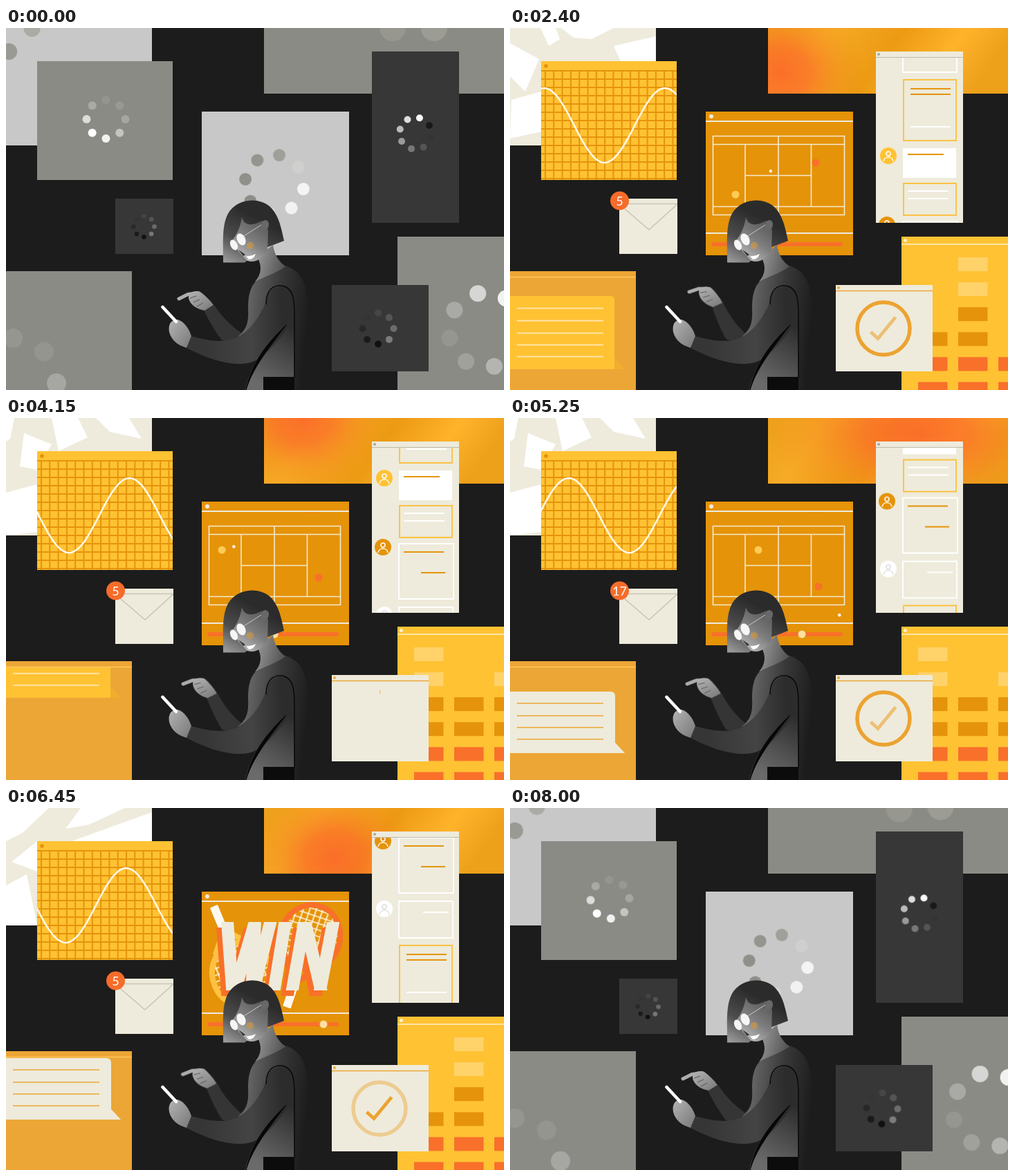
An HTML page that plays this animation: 720x524 px, repeating every 8.05 s.

```html
<!DOCTYPE html>
<html lang="en">
<head>
<meta charset="utf-8">
<title>Loading windows</title>
<style>
html, body { margin: 0; width: 100%; height: 100%; overflow: hidden; background: #1c1c1c; }
#stage { display: block; width: 720px; height: 524px; }
#stage * { animation-duration: 8.05s; animation-iteration-count: infinite; animation-timing-function: linear; }

#stage .page { animation-name: loaded; animation-timing-function: step-end; animation-delay: calc(var(--at) - 8.05s); }
@keyframes loaded { 0% { opacity: 1 } 75.776%, 100% { opacity: 0 } }

.dots { --turn: 226deg; animation-name: spin; }
.dots.back { --turn: -115deg; }
@keyframes spin {
  0%, 100% { transform: rotate(0deg) }
  50% { transform: rotate(var(--turn)) }
  50.01% { transform: rotate(calc(-1 * var(--turn))) }
}

#map { animation-name: map; }
@keyframes map {
  0%, 17.4% { d: path("M42 0L140 0L80 48L0 56Z M22 74L45 48L45 140L30 112Z M20 132L45 120L45 170L14 170Z M192 0L211 0L211 48L196 48Z M0 60L14 62L10 84L0 92Z") }
  29.8% { d: path("M0 22L42 45L22 92L0 70Z M74 0L150 0L118 16L92 14Z M2 104L45 92L45 150L0 160Z M44 0L66 0L72 16L56 26Z M150 26L211 12L211 48L160 48Z") }
  51.5%, 65.3% { d: path("M26 22L66 38L45 75L20 70Z M66 0L104 0L118 28L76 48Z M0 108L45 96L45 165L0 170Z M130 0L178 0L196 30L150 20Z M0 0L12 0L6 30L0 34Z") }
  80%, 100% { d: path("M0 0L62 0L24 36L0 48Z M108 0L172 0L120 24L86 30Z M0 112L30 96L45 170L0 170Z M95 48L211 6L211 48L130 48Z M8 78L45 48L45 92L24 84Z") }
}

#wave { animation-name: wave; }
@keyframes wave { to { transform: translateX(595.7px) } }

#glow { animation-name: glow; }
@keyframes glow {
  0%, 17.4% { transform: translate(440px, 118px) scale(1.2, .9) }
  29.8% { transform: translate(390px, 64px) }
  51.5% { transform: translate(428px, 0px) }
  65.2% { transform: translate(590px, 22px) scale(1.8, 1.1) }
  80.1% { transform: translate(475px, 72px) }
  100% { transform: translate(430px, 100px) }
}

#feed { animation-name: feed; }
@keyframes feed {
  0%, 17.4% { transform: translateY(0); animation-timing-function: cubic-bezier(.33, 0, .67, .33) }
  29.81% { transform: translateY(-27px) }
  51.55% { transform: translateY(-125px) }
  80.12% { transform: translateY(-264px) }
  100% { transform: translateY(-361px) }
}

#knob { animation-name: knob; }
@keyframes knob { 0%, 12.8% { transform: translateX(292px) } 88.6%, 100% { transform: translateX(480px) } }
#stage #play, #stage #court { animation-timing-function: step-end; }
#play { animation-name: play; }
@keyframes play { 0% { opacity: 1 } 50%, 100% { opacity: 0 } }
#court { animation-name: court; }
@keyframes court { 0% { opacity: 0 } 23.6% { opacity: 1 } 72.67%, 100% { opacity: 0 } }
#near { animation-name: near; }
@keyframes near {
  0%, 23% { transform: translate(318px, 222px) }
  29.81% { transform: translate(326px, 241px) }
  34.2% { transform: translate(320px, 232px) }
  51.55% { transform: translate(312px, 191px) }
  62%, 100% { transform: translate(359px, 191px) }
}
#far { animation-name: far; }
@keyframes far {
  0%, 23% { transform: translate(442px, 188px) }
  29.81% { transform: translate(442px, 195px) }
  42.2% { transform: translate(455px, 216px) }
  51.55% { transform: translate(452px, 231px) }
  65.22%, 100% { transform: translate(446px, 244px) }
}
#ball { animation-name: ball; }
@keyframes ball {
  0%, 24% { transform: translate(438px, 190px) }
  29.81% { transform: translate(377px, 207px) }
  34.2% { transform: translate(326px, 228px) }
  42.2% { transform: translate(450px, 215px) }
  50.3% { transform: translate(317px, 188px) }
  51.55% { transform: translate(329px, 186px) }
  57.1% { transform: translate(447px, 236px) }
  61.5% { transform: translate(362px, 194px) }
  65.22% { transform: translate(476px, 285px) }
  66.5%, 100% { transform: translate(515px, 315px) }
}
#win { transform-origin: 395px 215px; animation-name: win; }
@keyframes win {
  0%, 75.1% { opacity: 0; transform: scale(.6) }
  75.2% { opacity: 1; transform: scale(.6) }
  77%, 100% { opacity: 1; transform: none }
}

#note1 { animation-name: note1; }
@keyframes note1 {
  0%, 18% { transform: translateY(150px); animation-timing-function: ease-out }
  27% { transform: translateY(2px) }
  44% { transform: translateY(-30px) }
  51.55% { transform: translateY(-92px) }
  56%, 100% { transform: translateY(-150px) }
}
#note2 { animation-name: note2; }
@keyframes note2 {
  0%, 51.8% { transform: translateY(130px); animation-timing-function: ease-out }
  62% { transform: translateY(7px) }
  65.22% { transform: none }
  80.12% { transform: translateY(-34px) }
  100% { transform: translateY(-79px) }
}

#stage .tick { animation-duration: 2.68333s; animation-delay: -1.2667s; }
#ring { stroke-dasharray: 100; animation-name: ring; }
@keyframes ring {
  0%, 1.8% { stroke-dashoffset: 99.8; opacity: .5 }
  5% { opacity: 1 }
  25% { stroke-dashoffset: 0 }
  78% { stroke-dashoffset: 0; opacity: 1 }
  87.5% { opacity: .45 }
  95%, 100% { stroke-dashoffset: 0; opacity: 0 }
}
#mark { animation-name: mark; }
@keyframes mark { 0%, 28% { opacity: 0 } 36%, 44% { opacity: .6 } 55%, 90% { opacity: 1 } 97%, 100% { opacity: 0 } }

#stage .bars { animation-timing-function: step-end; }
#barsA { animation-name: barsA; }
#barsB { animation-name: barsB; }
@keyframes barsA { 0% { opacity: 1 } 40% { opacity: 0 } 72%, 100% { opacity: 1 } }
@keyframes barsB { 0% { opacity: 0 } 40% { opacity: 1 } 72%, 100% { opacity: 0 } }

#arm { transform-origin: 326px 452px; animation-name: arm; }
@keyframes arm {
  0%, 2% { transform: rotate(0deg); animation-timing-function: ease-in-out }
  13%, 17.4% { transform: rotate(9deg) }
  29.8% { transform: rotate(8deg) }
  51.5%, 65.2% { transform: rotate(5.5deg) }
  80.1%, 84% { transform: rotate(5deg); animation-timing-function: ease-in-out }
  96%, 100% { transform: rotate(0deg) }
}
#count { font: 18px Lato, "Open Sans", sans-serif; }
</style>
</head>
<body>
<svg id="stage" viewBox="0 0 720 524" width="720" height="524" fill="none">
<defs>
  <pattern id="grid" x="50" y="61" width="12.3" height="12" patternUnits="userSpaceOnUse"><path d="M0 1H12.3M1 0V12" stroke="#e5930a" stroke-width="2"/></pattern>
  <pattern id="strings" width="9" height="9" patternUnits="userSpaceOnUse"><path d="M0 4.5H9M4.5 0V9" stroke="#fff8e6" stroke-width="1.7"/></pattern>
  <radialGradient id="hot"><stop stop-color="#fb6a2b" stop-opacity=".92"/><stop offset=".35" stop-color="#fb6f29" stop-opacity=".75"/><stop offset=".7" stop-color="#f88224" stop-opacity=".3"/><stop offset="1" stop-color="#f88c1c" stop-opacity="0"/></radialGradient>
  <linearGradient id="amber" x2="1" y2=".2"><stop stop-color="#eda01a"/><stop offset=".25" stop-color="#f6ab26"/><stop offset=".55" stop-color="#ec9a14"/><stop offset=".8" stop-color="#ffb32b"/><stop offset="1" stop-color="#eda01a"/></linearGradient>
  <linearGradient id="hair" x1=".1" y1="1" x2=".5" y2=".25"><stop stop-color="#989898"/><stop offset=".45" stop-color="#4c4c4c"/><stop offset="1" stop-color="#2b2b2b"/></linearGradient>
  <linearGradient id="skin" x1=".2" y1="1" x2=".8" y2="0"><stop stop-color="#c2c2c2"/><stop offset=".5" stop-color="#7d7d7d"/><stop offset="1" stop-color="#555"/></linearGradient>
  <linearGradient id="neck" x2="1" y2=".3"><stop stop-color="#a0a0a0"/><stop offset="1" stop-color="#565656"/></linearGradient>
  <linearGradient id="body" gradientUnits="userSpaceOnUse" x1="348" y1="410" x2="437" y2="420"><stop stop-color="#656565"/><stop offset=".5" stop-color="#383838"/><stop offset="1" stop-color="#1c1c1c"/></linearGradient>
  <linearGradient id="side" gradientUnits="userSpaceOnUse" x1="362" y1="512" x2="412" y2="430"><stop stop-color="#6a6a6a"/><stop offset="1" stop-color="#2c2c2c"/></linearGradient>
  <linearGradient id="sleeve" gradientUnits="userSpaceOnUse" x1="285" y1="430" x2="400" y2="425"><stop stop-color="#363636"/><stop offset=".6" stop-color="#444"/><stop offset="1" stop-color="#2c2c2c"/></linearGradient>
  <linearGradient id="hand" x2="1" y2="1"><stop stop-color="#b4b4b4"/><stop offset="1" stop-color="#777"/></linearGradient>
  <clipPath id="cap"><rect x="295" y="165" width="200" height="99"/></clipPath>
  <g id="racket">
    <ellipse rx="41" ry="45" fill="url(#strings)"/>
    <ellipse rx="43" ry="47" stroke="currentColor" stroke-width="8"/>
    <path d="M-25 41L-3 66V76M25 41L3 66V76" stroke="currentColor" stroke-width="8"/>
    <rect x="-6" y="73" width="12" height="34" rx="1" fill="#fffaf0"/>
  </g>
  <g id="person" stroke="#fff" stroke-width="1.5"><circle cy="-3" r="3"/><path d="M-7 8C-6 0 6 0 7 8"/></g>
  <path id="letters" d="M319 150L328 274L360 165L355 274L386 150M386 274L406 150M412 274L434 150M431 160L457 270M452 274L476 150" stroke-width="18"/>
</defs>

<svg width="211" height="170" viewBox="0 0 211 170">
  <rect width="211" height="170" fill="#c8c8c8"/>
  <g class="dots" data-ring="-19 -23 61.5 12 22.8" data-tones="ababa5 9a9a94 95958f a0a09a"/>
  <g class="page" style="--at:1.2s"><rect width="211" height="170" fill="#eeebdc"/><path id="map" d="M0 0" fill="#fff"/></g>
</svg>

<svg x="45" y="48" width="196" height="172" viewBox="45 48 196 172">
  <rect x="45" y="48" width="196" height="172" fill="#8a8b85"/>
  <g class="dots" data-ring="144.5 132 28 6 -90" data-tones="94958f 989993 a5a6a0 c4c5c0 f2f2f1 fff dcdcda a9aaa4"/>
  <g class="page" style="--at:1.6s">
    <rect x="45" y="48" width="196" height="172" fill="#ffc233"/>
    <rect x="45" y="61" width="196" height="159" fill="url(#grid)"/>
    <circle cx="52" cy="55" r="2.8" fill="#e5930a"/>
    <path id="wave" stroke="#fffdf4" stroke-width="2.4"/>
  </g>
</svg>

<svg x="373" width="347" height="95" viewBox="373 0 347 95">
  <rect x="373" width="347" height="95" fill="#8a8b85"/>
  <g class="dots" data-ring="589 -72 78 19 67.4" data-tones="9c9c95 979790"/>
  <g class="page" style="--at:1.1s"><rect x="373" width="347" height="95" fill="url(#amber)"/><ellipse id="glow" rx="120" ry="105" fill="url(#hot)"/></g>
</svg>

<svg x="529" y="34" width="126" height="248" viewBox="529 34 126 248">
  <rect x="529" y="34" width="126" height="248" fill="#373737"/>
  <g class="dots back" data-ring="592 152.5 23 5 -75" data-tones="fafafa 191919 343434 555 777 999 bbb ddd"/>
  <g class="page" style="--at:1.3s">
    <rect x="529" y="34" width="126" height="248" fill="#eeebdc"/>
    <g id="feed" stroke-width="1.8">
      <g id="thread">
        <circle cx="547" cy="49" r="12" fill="#fff"/><use href="#person" x="547" y="49" style="filter:brightness(.87)"/>
        <path d="M568 38H646V91H568ZM603 54H640M579 170H637M575 263H634M575 274H634M568 307H647V387H568Z" stroke="#fff"/>
        <path d="M569 102H645V190H569ZM569 252H645V298H569Z" stroke="#fbc040"/>
        <path d="M579 115H637M579 123H637M575 319H633M600 349H635" stroke="#e5930a"/>
        <rect x="568" y="201" width="77" height="43" fill="#fff"/><path d="M575 210H627" stroke="#e5930a"/>
        <circle cx="547" cy="212" r="12" fill="#ffc233"/><use href="#person" x="547" y="212"/>
        <circle cx="545" cy="312" r="12" fill="#e5930a"/><use href="#person" x="545" y="312"/>
      </g>
      <use href="#thread" y="361"/>
    </g>
    <rect x="529" y="34" width="126" height="8" fill="#eeebdc"/>
    <path d="M529 42.5H655" stroke="#bdb9aa"/><circle cx="533" cy="38" r="2" fill="#aaa79a"/>
  </g>
</svg>

<svg x="283" y="121" width="213" height="208" viewBox="283 121 213 208">
  <rect x="283" y="121" width="213" height="208" fill="#c8c8c8"/>
  <g class="dots" data-ring="388 226 42.5 9 -80.5" data-tones="a0a09a cfd0ce f4f4f4 f2f2f2 d4d4d3 8d8d89 90908b 95958f"/>
  <g class="page" style="--at:.95s">
    <rect x="283" y="121" width="213" height="208" fill="#e59309"/>
    <use href="#racket" color="#ffc143" transform="translate(341.5 241) rotate(157.4)"/>
    <use href="#racket" color="#f8702a" transform="translate(440 187) rotate(18.6)"/>
    <path id="play" d="M375 189V248L414 219Z" fill="#fff"/>
    <g id="court">
      <rect x="283" y="137" width="213" height="192" fill="#e59309"/>
      <path d="M293.5 156.5H483.5V270.5H293.5ZM293 168.5H483M293 258.5H483M340 168V258M388 156V270M435.5 168V258M340 213.5H435" stroke="#f3ead0" stroke-width="1.6"/>
      <circle id="near" r="5.5" fill="#ffcb55"/><circle id="far" r="5.5" fill="#f8702a"/><circle id="ball" r="2.2" fill="#fff"/>
    </g>
    <path d="M283 135H496M283 297H496" stroke="#eeebdc" stroke-width="2"/><circle cx="291" cy="128" r="3" fill="#eeebdc"/>
    <path d="M294 313H478" stroke="#f8702a" stroke-width="6" stroke-linecap="round"/>
    <circle id="knob" cy="313" r="5.5" fill="#ffe0a0"/>
    <g id="win" role="img" aria-label="WIN">
      <g clip-path="url(#cap)" transform="translate(-7 8)"><use href="#letters" stroke="#f8702a"/></g>
      <g clip-path="url(#cap)"><use href="#letters" stroke="#eeebdc"/></g>
    </g>
  </g>
</svg>

<svg x="158" y="247" width="84" height="80" viewBox="158 247 84 80">
  <rect x="158" y="247" width="84" height="80" fill="#373737"/>
  <g class="dots back" data-ring="199.5 287.5 15 3.3 -90" data-tones="444 555 6a6a6a 777 111 1a1a1a 282828 333"/>
  <g class="page" style="--at:1.05s"><rect x="158" y="247" width="84" height="80" fill="#eeebdc"/><path d="M158 254.5H242M159 256L201 292L242 255" stroke="#c9c5b6" stroke-width="1.6"/></g>
</svg>
<g class="page" style="--at:1.05s"><circle cx="158.5" cy="250" r="13.5" fill="#f66c2a"/><text id="count" x="158.5" y="256.5" text-anchor="middle" fill="#fff">2</text></g>

<svg y="352" width="182" height="172" viewBox="0 352 182 172">
  <rect y="352" width="182" height="172" fill="#8a8b85"/>
  <g class="dots" data-ring="9 513 64 14 -89" data-tones="95968f 94958e a6a7a2 c0c0bc e0e0de eee ccc a0a19b"/>
  <g class="page" style="--at:1.3s">
    <rect y="352" width="182" height="172" fill="#eca636"/>
    <g id="note1"><path d="M-5 391H145Q151 391 151 397V483L166 497H-5Z" fill="#ffc233"/><path d="M151 480V497H166Z" fill="#f0ae30"/><path d="M10 409H135M10 427H135M10 445H135M10 462H135M10 479H135" stroke="#fff0cb" stroke-width="1.6"/></g>
    <g id="note2"><path d="M-5 396H145Q152 396 152 403V470L166 485H-5Z" fill="#eeebdc"/><path d="M10 413H135M10 431H135M10 448H135M10 465H135" stroke="#eca636" stroke-width="1.6"/></g>
    <rect y="352" width="182" height="8" fill="#eca636"/><path d="M0 360.5H182" stroke="#ffc65c" stroke-width="1.5"/>
  </g>
</svg>

<svg x="566" y="302" width="154" height="222" viewBox="566 302 154 222">
  <rect x="566" y="302" width="154" height="222" fill="#8a8b85"/>
  <g class="dots" data-ring="694 437 54 12 -102.7" data-tones="d6d6d4 f2f2f0 eee d0d0ce b4b5b1 a0a19b 959690 a9aaa5"/>
  <g class="page" style="--at:1.15s">
    <rect x="566" y="302" width="154" height="222" fill="#ffc233"/>
    <path d="M566 313H720" stroke="#fff0cb" stroke-width="1.6"/><circle cx="571.5" cy="307.5" r="2.5" fill="#fff0cb"/>
    <g id="barsA" class="bars" data-rows="3 6 2"/><g id="barsB" class="bars" data-rows="6 4 5"/>
  </g>
</svg>

<svg x="471" y="372" width="140" height="125" viewBox="471 372 140 125">
  <rect x="471" y="372" width="140" height="125" fill="#373737"/>
  <g class="dots back" data-ring="538 435 22.5 5 -90" data-tones="464646 555 6c6c6c 7c7c7c 111 1a1a1a 282828 353535"/>
  <g class="page" style="--at:1.5s">
    <rect x="471" y="372" width="140" height="125" fill="#eeebdc"/>
    <path d="M471 380.5H611" stroke="#eca636" stroke-width="1.5"/><circle cx="475" cy="376" r="2" fill="#eca636"/>
    <path id="ring" class="tick" pathLength="100" d="M540 397A38 38 0 0 1 540 473A38 38 0 0 1 540 397" stroke="#eca331" stroke-width="5.5"/>
    <path id="mark" class="tick" d="M521.5 440L532 449.5L557.5 418.5" stroke="#eca331" stroke-width="5"/>
  </g>
</svg>

<g id="woman">
  <g id="arm">
    <path d="M286 409L301 401C312 418 326 432 340 441L352 462L312 452C303 440 294 425 286 409Z" fill="#353535"/>
    <path d="M250 392L263 385.5L278 383.500" stroke="#adadad" stroke-width="5" stroke-linecap="round" stroke-linejoin="round"/>
    <path d="M264 385Q272 379 281 382C288 387 294 393 300 401L287 409C276 407 266 401 264 391Z" fill="url(#hand)"/>
    <path d="M266 391L275 388M271 397L280 393M276 403L285 398" stroke="#555"/>
  </g>
  <path d="M360 368C368 357 392 350 404 344C422 350 433 363 435 390C438 425 437 480 437 524H346C350 505 358 485 371 468L336 446C349 435 351 425 350 405C350 388 353 376 360 368Z" fill="url(#body)"/>
  <path d="M363 331L386 314C388 328 394 338 404 345C395 353 378 358 360 367C369 357 371 345 363 331Z" fill="url(#neck)"/>
  <path d="M417 420V506H372V524H347C354 495 378 456 408 428Z" fill="url(#side)"/>
  <path d="M376 396C378 374 402 368 412 381C421 396 419 418 410 430C393 454 374 478 354 484C330 491 295 481 261 463L268 446C292 453 315 456 332 449C352 439 366 420 376 396Z" fill="url(#sleeve)"/>
  <path d="M376 400C376 372 395 370 405 375C415 381 417 392 417 414V506" stroke="#090909" stroke-width="1.5"/>
  <path d="M405 430C378 456 355 484 347 524C356 494 374 471 405 430Z" fill="#070707" stroke="#070707"/>
  <rect x="372" y="505" width="45" height="19" fill="#0c0c0c"/>
  <path d="M261 463L268 446C265 436 258 425 248 422C238 422 234 430 236 440C239 452 248 459 261 463Z" fill="url(#hand)"/>
  <path d="M226.5 404L246 425" stroke="#fff" stroke-width="4.6" stroke-linecap="round"/>
  <path d="M314 339.5C314 305 311 275 328 260C345 245 371 247 384 261C395 273 398 290 402 308L376 318L345 339.5Z" fill="url(#hair)"/>
  <path d="M341 274C345 288 358 286 370 279L379 292L378 321C372 333 361 341 349 337L336 323L327 308C334 298 339 288 341 274Z" fill="url(#skin)"/>
  <path d="M369 284C371 276 380 277 380 284C380 291 374 295 369 293Z" fill="#686868"/>
  <path d="M344 301L369 285" stroke="#c8c8c8"/>
  <ellipse cx="340" cy="306" rx="6" ry="9" transform="rotate(-25 340 306)" fill="#f6f6f6"/>
  <ellipse cx="329.5" cy="314" rx="5" ry="8" transform="rotate(-25 329.5 314)" fill="#f6f6f6"/>
  <path d="M336 321L346 328L343 330Z" fill="#303030"/>
  <path d="M347 330Q354 331 361 327Q358 335 351 335Z" fill="#fff"/>
  <circle cx="353" cy="315" r="5" fill="#d99738" opacity=".6"/>
</g>
</svg>
<script>
const LOOP = 8050;
const make = (parent, tag, attrs) => {
  const el = document.createElementNS('http://www.w3.org/2000/svg', tag);
  for (const key in attrs) el.setAttribute(key, attrs[key]);
  parent.append(el);
};

for (const g of document.querySelectorAll('.dots')) {
  const [cx, cy, radius, r, start] = g.dataset.ring.split(' ').map(Number);
  const tones = g.dataset.tones.split(' ');
  g.style.transformOrigin = `${cx}px ${cy}px`;
  for (let i = 0; i < 8; i++) {
    const a = (start + i * 45) * Math.PI / 180;
    make(g, 'circle', { cx: cx + radius * Math.cos(a), cy: cy + radius * Math.sin(a), r, fill: '#' + tones[i % tones.length] });
  }
}

const rowTones = ['#f8702a', '#f8702a', '#e5930a', '#e5930a', '#ffd26a', '#ffd26a'];
for (const g of document.querySelectorAll('.bars')) {
  g.dataset.rows.split(' ').forEach((rows, col) => {
    for (let i = 0; i < rows; i++) {
      make(g, 'rect', { x: 590 + col * 58, y: 512.5 - i * 36.1, width: 42.5, height: 20, fill: rowTones[i] });
    }
  });
}

const points = [];
for (let x = -570; x <= 250; x += 3) {
  points.push(x + ' ' + (141 - 54 * Math.cos(2 * Math.PI * (x - 46.4) / 175)).toFixed(1));
}
document.getElementById('wave').setAttribute('d', 'M' + points.join('L'));

// Unread count: [from ms, value]
const counts = [[0, 1], [1300, 2], [1700, 3], [2000, 4], [2250, 5], [4450, 8], [4750, 12], [5050, 17], [5850, 5]];
const count = document.getElementById('count');
function tick() {
  const t = performance.now() % LOOP;
  const value = String(counts.findLast(([from]) => t >= from)[1]);
  if (count.textContent !== value) count.textContent = value;
  requestAnimationFrame(tick);
}
tick();
</script>
</body>
</html>
```
